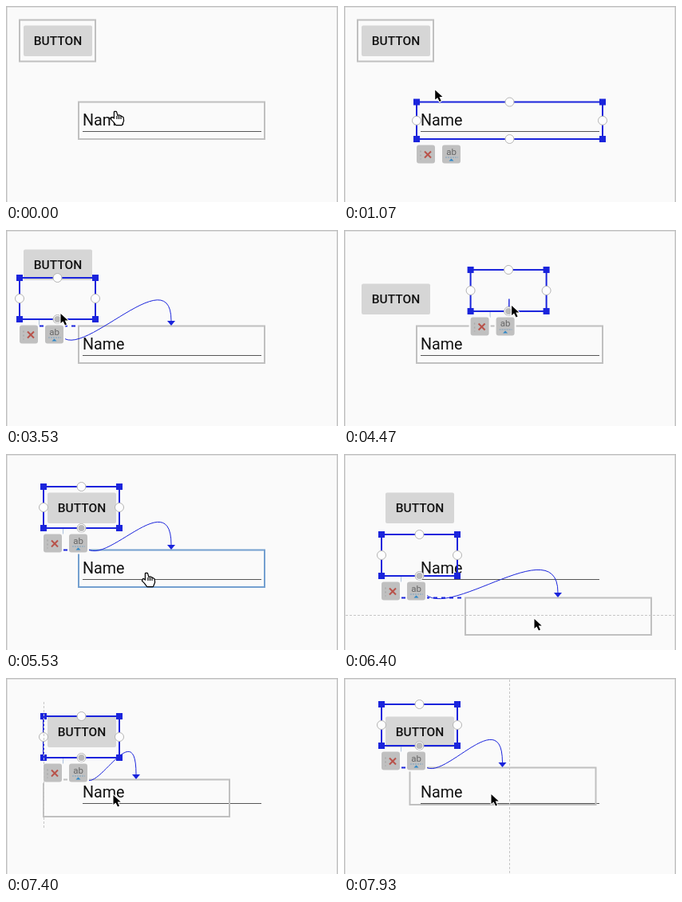
An HTML page with a canvas that plays this animation: 416 by 246 pixels, repeating every 8000 ms.

```html
<!DOCTYPE html>
<html lang="en">
<head>
<meta charset="utf-8">
<title>Layout editor constraint</title>
<style>
html, body { margin: 0; width: 100%; height: 100%; overflow: hidden; background: #fafafa; }
canvas { display: block; }
</style>
</head>
<body>
<canvas id="stage" width="416" height="246"></canvas>
<script>
const c = document.getElementById('stage').getContext('2d');
const LOOP = 8000, BG = '#fafafa', GREY = '#c0c0c0', BLUE = '#1a24dc';
const BTN = { w: 95, h: 52 }, FIELD = { w: 233, h: 46.5 };
const HOME = { cursor: [137, 133], button: [17, 17.5], field: [91, 120.5] };

// Each step eases the things it names to a new place.
const steps = [
  { from: 900, to: 1350, cursor: [65, 45] },
  { from: 1700, to: 2050, cursor: [64, 69] },
  { from: 2110, to: 2800, cursor: [206, 119] },
  { from: 3050, to: 3500, cursor: [68, 104], button: [17, 60] },
  { from: 3750, to: 4250, cursor: [210, 94], button: [159, 50] },
  { from: 4450, to: 5050, cursor: [98, 85], button: [47, 41] },
  { from: 5150, to: 5450, cursor: [176, 150] },
  { from: 5650, to: 6340, cursor: [238, 206], field: [152, 180.5] },
  { from: 6450, to: 7360, cursor: [134, 146], field: [47, 127.5] },
  { from: 7460, to: 7900, cursor: [184, 145], field: [82.5, 112.5] }
];

const within = (t, a, b) => t >= a && t < b;

function place(name, t) {
  let [x, y] = HOME[name];
  for (const s of steps) {
    if (!s[name] || t < s.from) continue;
    const u = Math.min(1, (t - s.from) / (s.to - s.from)), e = u * u * (3 - 2 * u);
    x += (s[name][0] - x) * e;
    y += (s[name][1] - y) * e;
  }
  return { x, y };
}

function line(x1, y1, x2, y2, color, width = 1, dash = []) {
  c.strokeStyle = color;
  c.lineWidth = width;
  c.setLineDash(dash);
  c.beginPath();
  c.moveTo(x1, y1);
  c.lineTo(x2, y2);
  c.stroke();
  c.setLineDash([]);
}

function box(p, size, color) {
  c.strokeStyle = color;
  c.lineWidth = 2;
  c.strokeRect(p.x, p.y, size.w, size.h);
}

function round(x, y, w, h, r, color) {
  c.fillStyle = color;
  c.beginPath();
  c.roundRect(x, y, w, h, r);
  c.fill();
}

function disc(x, y, r, fill, stroke, width = 1) {
  c.beginPath();
  c.arc(x, y, r, 0, 7);
  c.fillStyle = fill;
  c.fill();
  if (!stroke) return;
  c.strokeStyle = stroke;
  c.lineWidth = width;
  c.stroke();
}

// Draws an SVG path at x, y with its outline below the fill.
function shape(d, x, y, fill, stroke, width) {
  const path = new Path2D(d);
  c.save();
  c.translate(x, y);
  c.lineJoin = 'round';
  if (stroke) {
    c.strokeStyle = stroke;
    c.lineWidth = width;
    c.stroke(path);
  }
  c.fillStyle = fill;
  c.fill(path);
  c.restore();
}

function text(s, x, y, font, color, align = 'left') {
  c.font = font + ' Roboto, sans-serif';
  c.fillStyle = color;
  c.textAlign = align;
  c.fillText(s, x, y);
}

function anchor(x, y, filled) {
  disc(x, y, 5.5, '#fdfdfd', '#b4b4b4');
  if (filled) disc(x, y, 4, '#bababa');
}

function tools(x, y) {
  for (const dx of [0, 32]) {
    round(x + dx - 2, y - 2, 27, 27, 4, BG);
    round(x + dx, y, 23, 23, 3, GREY);
  }
  line(x + 10, y + 8, x + 18, y + 16, '#b8524a', 2);
  line(x + 18, y + 8, x + 10, y + 16, '#b8524a', 2);
  line(x + 5, y + 7, x + 5, y + 18, '#a8a8a8', 1.5, [2, 3]);
  text('ab', x + 43.5, y + 12, '11.5px', '#666', 'center');
  line(x + 36, y + 15.5, x + 52, y + 15.5, '#7fa3c0', 1, [2, 1]);
  shape('M0 0l3 3h-6z', x + 43.5, y + 17, '#2d87c8');
}

function selection({ x, y }, size, connected, active) {
  const mx = x + size.w / 2, my = y + size.h / 2;
  const right = x + size.w, bottom = y + size.h;
  box({ x, y }, size, BLUE);
  c.fillStyle = BLUE;
  for (const hx of [x, right])
    for (const hy of [y, bottom]) c.fillRect(hx - 4, hy - 4, 8, 8);
  anchor(mx, y);
  anchor(x, my);
  anchor(right, my);
  if (active) disc(mx, bottom - 0.5, 7, '#aaa', '#22862b', 3);
  else anchor(mx, bottom, connected);
  tools(x, bottom + 7.5);
}

function connection(b, f) {
  const x1 = b.x + BTN.w / 2, y1 = b.y + BTN.h;
  const x2 = f.x + FIELD.w / 2 - 0.5, y2 = f.y - 6.5;
  if (f.x > b.x + 25) line(b.x + 25, f.y, f.x, f.y, BLUE, 2, [5, 5]);
  line(b.x + 24.5, y1, b.x + 24.5, y1 + 8, '#a9bfdc');
  c.strokeStyle = BLUE;
  c.lineWidth = 1;
  c.beginPath();
  c.moveTo(x1, y1);
  c.bezierCurveTo(x1, y1 + 90, x2, y2 - 90, x2, y2);
  c.stroke();
  shape('M-5 0h10l-5 6z', x2, y2, BLUE);
}

function guides(t, b, f) {
  const dashed = (...p) => line(...p, '#c6c6c6', 1, [3, 2]);
  if (within(t, 6320, 6500)) dashed(2, 202.5, 414, 202.5);
  if (within(t, 4230, 4470) || t >= 7900) dashed(207.5, 2, 207.5, 246);
  if (within(t, 7330, 7480)) dashed(47.5, b.y - 18, 47.5, f.y + 62);
}

function cursor({ x, y }, hand) {
  if (!hand) return shape('M.5 1v12l3-2.5 2.5 5 2-1-2.3-5h4z', x, y, '#000', '#fff', 2);
  shape('M-1 0h2l1.5 5 2.5-.5 2 1 2.5 1.5.5 4-2 5h-7l-3-4-3-3 1-2 3 2z', x, y, '#fff', '#000', 2.4);
  for (const dx of [2, 4.5, 7]) line(x + dx, y + 5, x + dx, y + 9, '#000', 1.2);
}

function draw(t) {
  const f = place('field', t), b = place('button', t);
  b.y += f.y - HOME.field[1];
  const shown = t < 3600 ? [17, 17] : t < 5100 ? [17, 60] : [47, 41];
  const fieldPicked = within(t, 300, 1450), buttonPicked = t >= 1450;

  c.fillStyle = BG;
  c.fillRect(0, 0, 416, 246);
  c.fillStyle = GREY;
  c.fillRect(0, 0, 416, 1.5);
  c.fillRect(0, 0, 1.5, 246);
  c.fillRect(414.5, 0, 1.5, 246);

  // Rendered widgets lag behind the outlines that are dragged.
  round(shown[0] + 5, shown[1] + 7.5, 86, 38.5, 2, '#d6d6d6');
  text('BUTTON', shown[0] + 48, shown[1] + 32, '500 15.5px', '#111', 'center');
  text('Name', 96, 150, '19.7px', '#111');
  line(96, 157.5, 320, 157.5, '#555');

  if (!fieldPicked) box(f, FIELD, within(t, 5450, 5650) ? '#74a0d0' : GREY);
  if (!buttonPicked) box(b, BTN, GREY);
  if (t >= 3000) connection(b, f);
  if (within(t, 2100, 3000)) {
    anchor(207, 120);
    anchor(207, 167);
  }
  if (fieldPicked) selection(f, FIELD);
  if (buttonPicked) selection(b, BTN, t >= 3000, within(t, 2000, 3000));
  guides(t, b, f);
  cursor(place('cursor', t), t < 1000 || within(t, 1250, 1500) || within(t, 5380, 5700));
}

function tick(now) {
  draw(now % LOOP);
  requestAnimationFrame(tick);
}
draw(0);
requestAnimationFrame(tick);
</script>
</body>
</html>
```
